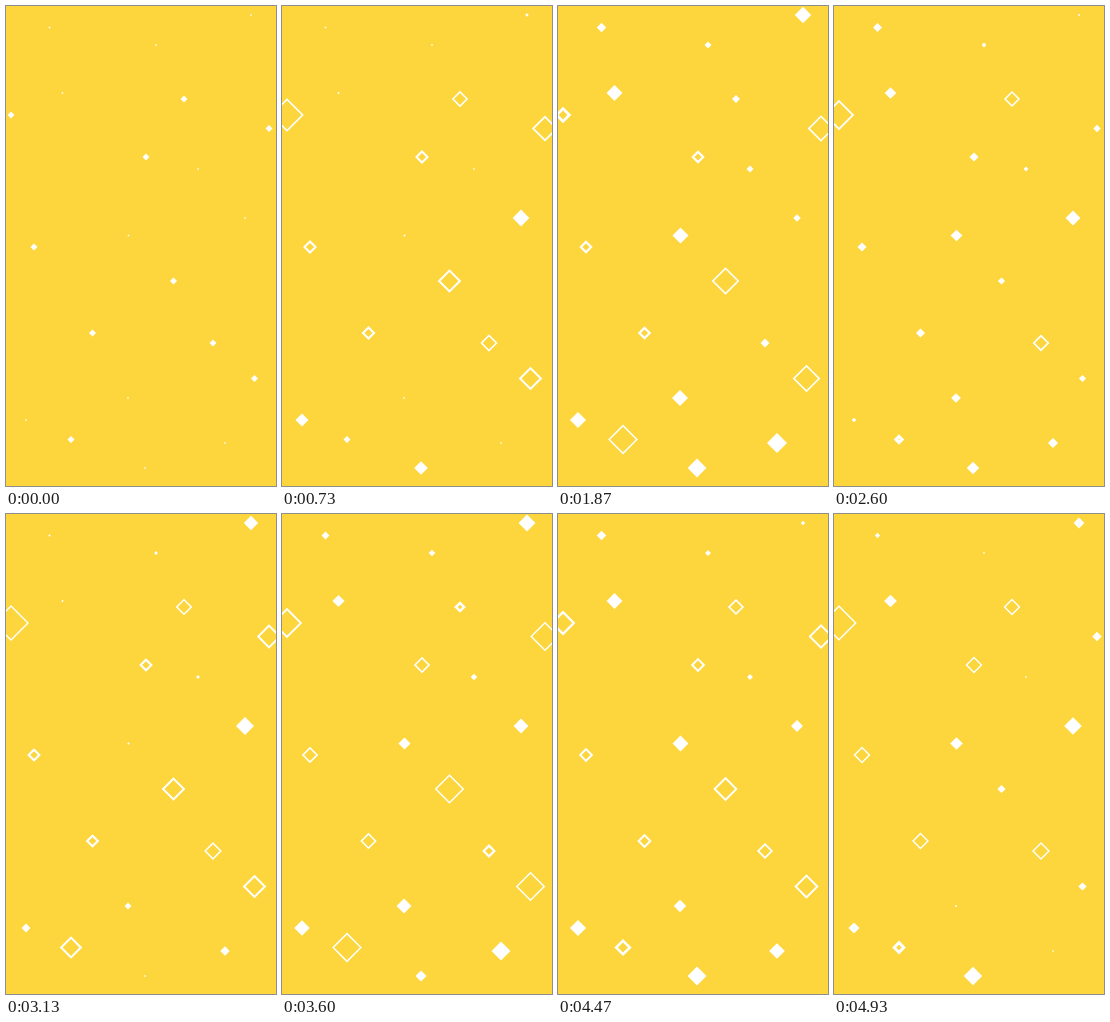
Write an HTML page with a canvas that moves like this. It is 270 by 480 pixels and loops after 4990 ms.

```html
<!DOCTYPE html>
<html lang="en">
<head>
<meta charset="utf-8">
<title>Pulsing diamonds</title>
<style>
html, body { margin: 0; width: 100%; height: 100%; overflow: hidden; background: #fcd63c; }
canvas { display: block; width: 100vw; height: 100vh; }
</style>
</head>
<body>
<canvas id="stage" width="270" height="480"></canvas>
<script>
const ctx = document.getElementById('stage').getContext('2d');
const LOOP = 4990, FPS = 15;

// The curve of CSS "ease": cubic-bezier(.25, .1, .25, 1)
function ease(x) {
  if (x <= 0 || x >= 1) return x <= 0 ? 0 : 1;
  const bez = (a, b, s) => 3 * a * s * (1 - s) ** 2 + 3 * b * s * s * (1 - s) + s ** 3;
  let lo = 0, hi = 1;
  for (let i = 0; i < 24; i++) {
    const mid = (lo + hi) / 2;
    if (bez(.25, .25, mid) < x) lo = mid; else hi = mid;
  }
  return bez(.1, 1, lo);
}

// Grow and shrink in turn, each taking "half" seconds
const pulse = (half, delay = 0) => t => {
  const x = Math.max(0, t - delay) / half % 2;
  return ease(x > 1 ? 2 - x : x);
};
// Grow, then start over at once
const regrow = period => t => (t % period / period) ** .6;

const group = (min, max, hollow, wave, ...spots) => ({ min, max, hollow, wave, spots });
const ring = (max, wave, ...spots) => group(3.5, max, true, wave, ...spots);
const dot = (max, wave, ...spots) => group(1.1, max, false, wave, ...spots);

const groups = [
  ring(18, pulse(1.01), [5, 109]),
  ring(8.5, pulse(.95), [178, 93]),
  ring(9, pulse(.97), [207, 337]),
  ring(15, pulse(1.25), [263, 122.5]),
  ring(15, pulse(1.2, .15), [167.5, 275], [248.5, 372.5]),
  ring(15, pulse(1, .667), [65, 433.5]),
  ring(8.5, regrow(1.22), [140, 151], [28, 241], [86.5, 327]),
  dot(8.5, pulse(.99, .57), [245, 9]),
  dot(5, pulse(1, 1.11), [43.5, 21.5]),
  dot(3.5, pulse(1, .85), [150, 39], [192, 163]),
  dot(8, pulse(1.2, .62), [56.5, 87], [122.5, 229.5]),
  dot(8, pulse(1, .85), [122, 392]),
  dot(10, pulse(1.03, .75), [219, 437]),
  dot(9, pulse(1.01), [239, 212]),
  dot(8.5, pulse(1.307, .1), [20, 414]),
  dot(9.5, pulse(1.5, .067), [139, 462])
];

function diamond(x, y, r) {
  ctx.moveTo(x, y - r);
  ctx.lineTo(x + r, y);
  ctx.lineTo(x, y + r);
  ctx.lineTo(x - r, y);
  ctx.closePath();
}

function draw(t) {
  ctx.fillStyle = '#fcd63c';
  ctx.fillRect(0, 0, 270, 480);
  ctx.fillStyle = '#fff';
  for (const g of groups) {
    const p = g.wave(t);
    const r = g.min + (g.max - g.min) * p;
    // The border thins as the ring opens
    const hole = g.hollow ? r - (5 - 3 * p) : 0;
    for (const [x, y] of g.spots) {
      ctx.beginPath();
      diamond(x, y, r);
      if (hole > 0) diamond(x, y, hole);
      ctx.fill('evenodd');
    }
  }
}

const start = performance.now();
function tick() {
  const ms = (performance.now() - start) % LOOP;
  // Steps fall on whole hundredths of a second
  const step = Math.floor((Math.floor(ms / 10) * 10 + 9.99) * FPS / 1000);
  draw(Math.max(0, step - 1) / FPS);
  requestAnimationFrame(tick);
}
tick();
</script>
</body>
</html>
```
